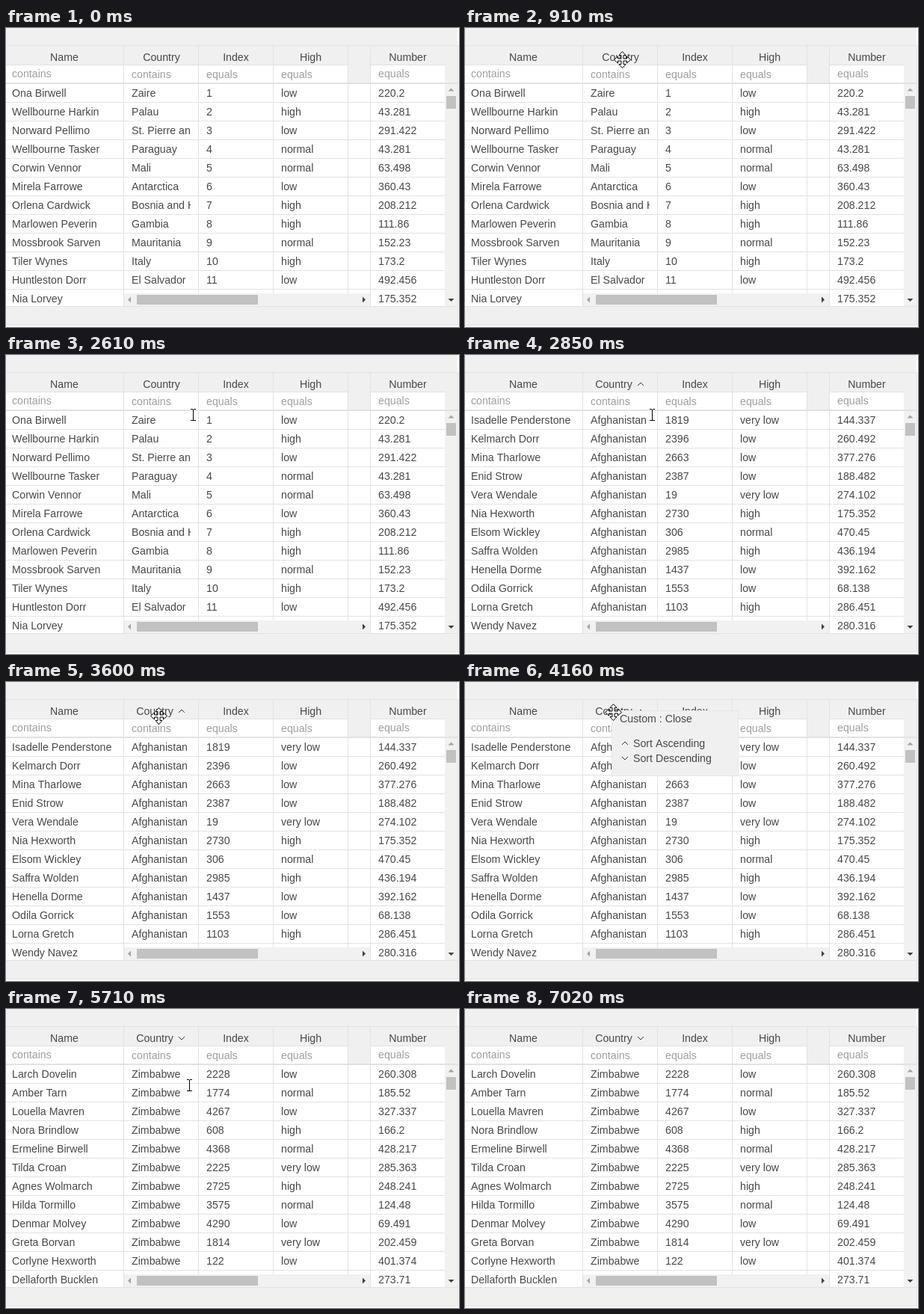
Animation, 606 px wide and 400 px high, one loop 7.8 s. Source, as an HTML page with a canvas:

```html
<!DOCTYPE html>
<html lang="en">
<head>
<meta charset="utf-8">
<title>Grid column menu</title>
<style>
  html, body { margin: 0; width: 100%; height: 100%; overflow: hidden; background: #fff; }
  canvas { display: block; }
</style>
</head>
<body>
<canvas id="stage" width="606" height="400"></canvas>
<script>
const ctx = document.getElementById('stage').getContext('2d');
const LOOP = 7800;
const INK = '#484848', HINT = '#9c9f9c', PANEL = '#f0f0f0', LINE = '#e2e2e2';
const FONT = '14.2px "Liberation Sans", Arial, sans-serif';

// name | country | index | high | number
const parse = text => text.trim().split('\n').map(row => row.trim().split('|'));
const unsorted = parse(`
  Ona Birwell|Zaire|1|low|220.2
  Wellbourne Harkin|Palau|2|high|43.281
  Norward Pellimo|St. Pierre and Miquelon|3|low|291.422
  Wellbourne Tasker|Paraguay|4|normal|43.281
  Corwin Vennor|Mali|5|normal|63.498
  Mirela Farrowe|Antarctica|6|low|360.43
  Orlena Cardwick|Bosnia and Herzegovina|7|high|208.212
  Marlowen Peverin|Gambia|8|high|111.86
  Mossbrook Sarven|Mauritania|9|normal|152.23
  Tiler Wynes|Italy|10|high|173.2
  Huntleston Dorr|El Salvador|11|low|492.456
  Nia Lorvey||||175.352`);
const ascending = parse(`
  Isadelle Penderstone|Afghanistan|1819|very low|144.337
  Kelmarch Dorr|Afghanistan|2396|low|260.492
  Mina Tharlowe|Afghanistan|2663|low|377.276
  Enid Strow|Afghanistan|2387|low|188.482
  Vera Wendale|Afghanistan|19|very low|274.102
  Nia Hexworth|Afghanistan|2730|high|175.352
  Elsom Wickley|Afghanistan|306|normal|470.45
  Saffra Wolden|Afghanistan|2985|high|436.194
  Henella Dorme|Afghanistan|1437|low|392.162
  Odila Gorrick|Afghanistan|1553|low|68.138
  Lorna Gretch|Afghanistan|1103|high|286.451
  Wendy Navez||||280.316`);
const descending = parse(`
  Larch Dovelin|Zimbabwe|2228|low|260.308
  Amber Tarn|Zimbabwe|1774|normal|185.52
  Louella Mavren|Zimbabwe|4267|low|327.337
  Nora Brindlow|Zimbabwe|608|high|166.2
  Ermeline Birwell|Zimbabwe|4368|normal|428.217
  Tilda Croan|Zimbabwe|2225|very low|285.363
  Agnes Wolmarch|Zimbabwe|2725|high|248.241
  Hilda Tormillo|Zimbabwe|3575|normal|124.48
  Denmar Molvey|Zimbabwe|4290|low|69.491
  Greta Borvan|Zimbabwe|1814|very low|202.459
  Corlyne Hexworth|Zimbabwe|122|low|401.374
  Dellaforth Bucklen||||273.71`);

const columns = [
  { title: 'Name', x: 8, mid: 78, hint: 'contains', base: 66 },
  { title: 'Country', x: 168, mid: 208, hint: 'contains', base: 67 },
  { title: 'Index', x: 268, mid: 307.5, hint: 'equals', base: 67 },
  { title: 'High', x: 368, mid: 407.5, hint: 'equals', base: 67 },
  { title: 'Number', x: 498, mid: 537.5, hint: 'equals', base: 66 }
];

const menus = [
  { from: 1300, to: 2610, x: 207, y: 39 },
  { from: 4160, to: 5470, x: 196, y: 38 }
];
const items = [
  { label: 'Custom : Close', top: 1, base: 16, indent: 11 },
  { label: 'Sort Ascending', top: 34, base: 49, indent: 29, dir: -1 },
  { label: 'Sort Descending', top: 54, base: 69, indent: 29, dir: 1 }
];

const smooth = p => p * p * (3 - 2 * p);
const easeOut = p => 1 - (1 - p) ** 1.65;
const easeIn = p => p ** 1.4;

const overGrid = y => y < 50 ? drawMove : y < 74 ? drawBeam : drawArrow;
const overMenu = menu => y => {
  const dy = y - menu.y;
  return items.some(i => dy > i.base - 13 && dy < i.base + 3) ? drawBeam : drawArrow;
};

// Pointer trips: n evenly timed steps along a curve a -> via -> b
const trips = [
  { from: 70, to: 760, n: 10, a: [510, 395], b: [211, 42.5], ease: smooth, shape: overGrid },
  { from: 910, to: 990, n: 2, a: [211, 42.5], b: [210, 41.5], ease: smooth, shape: overGrid },
  { from: 1690, to: 2220, n: 8, a: [209, 41], via: [244, 58], b: [250, 80], ease: easeOut, shape: overMenu(menus[0]), menu: menus[0] },
  { from: 3000, to: 3680, n: 10, a: [250, 80], b: [199.5, 41.5], ease: smooth, shape: overGrid },
  { from: 3840, to: 3990, n: 2, a: [199.5, 41.5], b: [198.5, 40.5], ease: smooth, shape: overGrid },
  { from: 4380, to: 4860, n: 7, a: [198.5, 40.5], via: [225, 62], b: [245, 102], ease: smooth, shape: overMenu(menus[1]), menu: menus[1] },
  { from: 6490, to: 7020, n: 8, a: [245, 102], b: [640, 430], ease: easeIn, shape: overGrid }
];

function box(x, y, w, h, color) {
  ctx.fillStyle = color;
  ctx.fillRect(x, y, w, h);
}
function write(text, x, y, color = INK, align = 'left') {
  ctx.fillStyle = color;
  ctx.textAlign = align;
  ctx.fillText(text, x, y);
}
function shape(points, fill, stroke) {
  ctx.beginPath();
  points.forEach(([x, y]) => ctx.lineTo(x, y));
  if (fill) {
    ctx.closePath();
    ctx.fillStyle = fill;
    ctx.fill();
  }
  if (stroke) {
    ctx.strokeStyle = stroke;
    ctx.lineWidth = 1;
    ctx.stroke();
  }
}
function chevron(x, y, dir) {
  shape([[x - 4, y - 2 * dir], [x, y + 2 * dir], [x + 4, y - 2 * dir]], null, '#333');
}
function triangle(x, y, dx, dy, color) {
  shape([[x + 3 * dx, y + 3 * dy], [x - dx + 4 * dy, y - dy + 4 * dx], [x - dx - 4 * dy, y - dy - 4 * dx]], color);
}

function drawArrow(x, y) {
  ctx.translate(Math.round(x) + 0.5, Math.round(y) + 0.5);
  shape([[0, 0], [0, 16], [4, 12.5], [6.5, 18], [9, 17], [6.5, 11.5], [11, 11.5]], '#fff', '#000');
}
function drawBeam(x, y) {
  ctx.translate(Math.round(x), Math.round(y));
  box(0, -7, 1, 15, '#000');
  for (const end of [-8, 7]) {
    box(-3, end, 3, 1, '#000');
    box(1, end, 3, 1, '#000');
  }
}
function drawMove(x, y) {
  ctx.translate(Math.floor(x) + 0.5, Math.floor(y) + 0.5);
  const arm = [[-1.5, -1.5], [-1.5, -6], [-4.5, -6], [0, -11], [4.5, -6], [1.5, -6]];
  const points = [];
  for (let i = 0; i < 4; i++) {
    const c = [1, 0, -1, 0][i], s = [0, 1, 0, -1][i];
    arm.forEach(([px, py]) => points.push([px * c - py * s, px * s + py * c]));
  }
  shape(points, '#fff', '#000');
}

function drawGrid(rows, sort) {
  box(0, 0, 606, 400, '#fff');
  box(0, 0, 604, 397, PANEL);
  box(0, 50, 457, 23, '#fff');
  box(488, 50, 99, 23, '#fff');
  box(0, 75, 587, 297, '#fff');

  box(0, 23, 605, 1, LINE);
  box(0, 49, 457, 1, LINE);
  box(488, 49, 99, 1, LINE);
  box(0, 73, 604, 2, LINE);
  for (let y = 99; y < 372; y += 25) box(0, y, 587, 1, LINE);
  for (const x of [157, 257, 357, 457, 487]) box(x, 24, 1, 348, LINE);
  box(0, 372, 604, 1, LINE);
  box(0, 397, 605, 1, LINE);
  box(604, 23, 1, 375, LINE);

  columns.forEach((col, i) => {
    const shift = sort && i === 1 ? -9 : 0;
    write(col.title, col.mid + shift, 44, INK, 'center');
    write(col.hint, col.x, col.base, HINT);
    ctx.save();
    if (i === 1) {
      ctx.beginPath();
      ctx.rect(168, 75, 79, 297);
      ctx.clip();
    }
    rows.forEach((row, r) => write(row[i], col.x, 92 + 25 * r));
    ctx.restore();
  });
  if (sort) chevron(235, 39, sort);

  box(158, 355, 329, 17, '#f1f1f1');
  box(175, 357, 162, 13, '#c1c1c1');
  triangle(166, 363.5, -1, 0, '#a3a3a3');
  triangle(478, 363.5, 1, 0, '#404040');
  box(587, 75, 17, 297, '#f1f1f1');
  box(589, 91, 13, 17, '#c1c1c1');
  triangle(595.5, 83.5, 0, -1, '#a3a3a3');
  triangle(595.5, 363, 0, 1, '#404040');
}

function drawMenu({ x, y }, active) {
  box(x, y, 170, 88, '#e6e6e6');
  box(x + 1, y + 1, 168, 86, PANEL);
  items.forEach((item, i) => {
    const on = i === active, dx = on ? 6 : 0;
    if (on) {
      box(x + 1, y + item.top, 169, 20, '#e0ffff');
      box(x + 1, y + item.top, 6, 20, '#808080');
    }
    write(item.label, x + item.indent + dx, y + item.base);
    if (item.dir) chevron(x + 18 + dx, y + item.base - 5, item.dir);
  });
}

function pointerAt(t) {
  const trip = trips.filter(s => t >= s.from).pop();
  if (!trip || t >= 7020) return null;
  const { from, to, n, a, b } = trip;
  const step = Math.min(n, 1 + Math.floor((t - from) / (to - from) * (n - 1) + 1e-6));
  const u = trip.ease(step / n);
  const via = trip.via || [(a[0] + b[0]) / 2, (a[1] + b[1]) / 2];
  const [x, y] = a.map((v, i) => (1 - u) ** 2 * v + 2 * u * (1 - u) * via[i] + u * u * b[i]);
  return { x, y, draw: trip.shape(y), menu: trip.menu };
}

function draw(t) {
  ctx.font = FONT;
  const pointer = pointerAt(t);
  if (t < 2850) drawGrid(unsorted, 0);
  else if (t < 5710) drawGrid(ascending, -1);
  else drawGrid(descending, 1);

  const menu = menus.find(m => t >= m.from && t < m.to);
  if (menu) {
    const dy = pointer.y - menu.y;
    const active = pointer.menu !== menu ? -1 : dy < 33 ? 0 : dy < 54 ? 1 : 2;
    drawMenu(menu, active);
  }
  if (pointer) {
    ctx.save();
    pointer.draw(pointer.x, pointer.y);
    ctx.restore();
  }
}

const start = performance.now();
function tick() {
  draw((performance.now() - start) % LOOP);
  requestAnimationFrame(tick);
}
tick();
</script>
</body>
</html>
```
